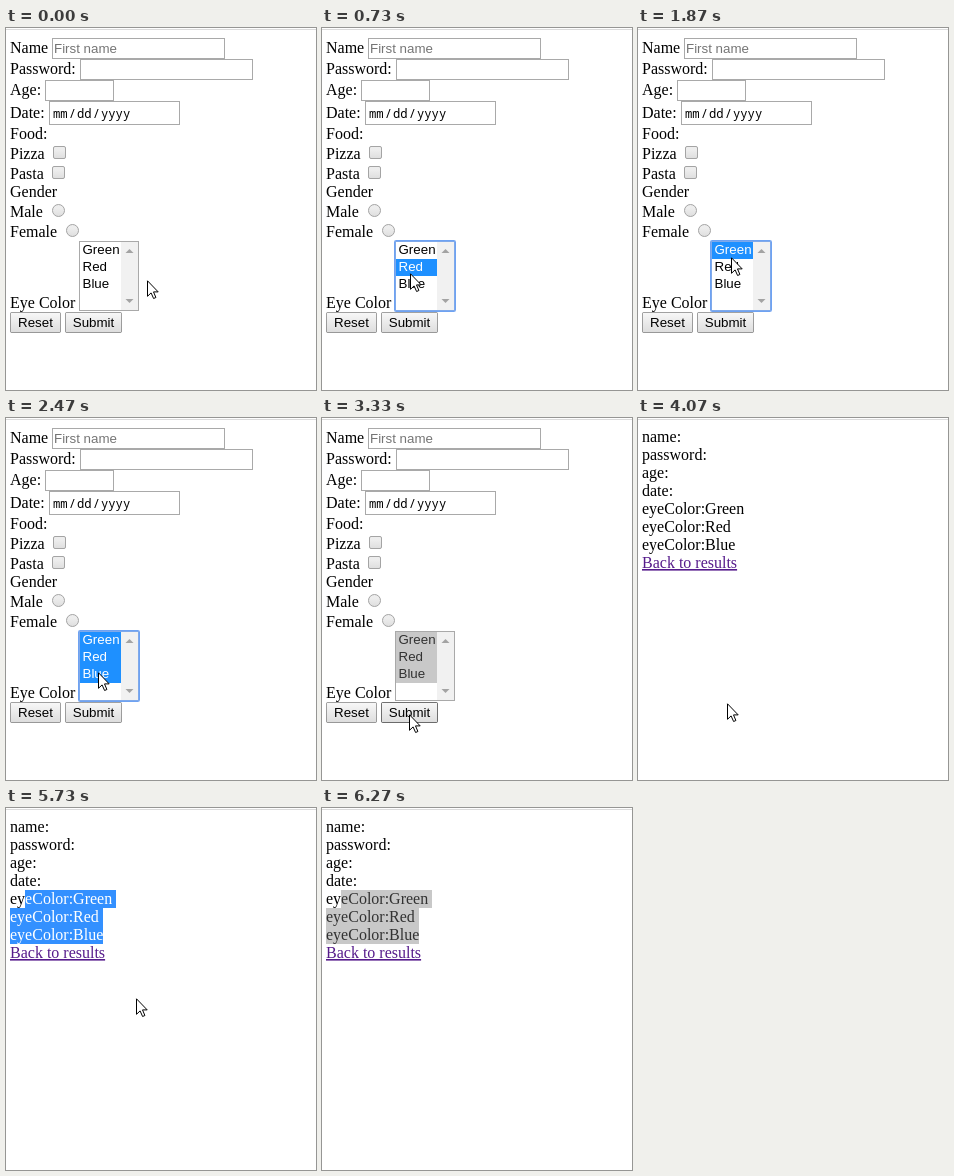
Recreate the animation shown at these times as an HTML page. Size 310 by 362 pixels, loop 6340 ms.

```html
<!DOCTYPE html>
<html lang="en">
<head>
<meta charset="utf-8">
<title>Form demo</title>
<style>
  html, body { margin: 0; width: 100%; height: 100%; overflow: hidden; background: #fff; }
  svg { display: block; width: 310px; height: 362px; }
  text { font: 16px "Liberation Serif", "Times New Roman", serif; white-space: pre; }
  .ui { font: 13.333px "Liberation Sans", Arial, sans-serif; }
  .mono { font: 12.2px "Noto Sans Mono", "DejaVu Sans Mono", monospace; }
  .mid { text-anchor: middle; }
  .field { fill: #fff; stroke: #a9a9a9; }
  .check { fill: url(#soft); stroke: #a4a4a4; }
  .button { fill: url(#raised); stroke: #000; stroke-opacity: .36; }
  .button.hover { stroke-opacity: .55; }
  .button.down { fill: #d6d6d6; }
</style>
</head>
<body>
<svg id="stage" viewBox="0 0 310 362" xmlns="http://www.w3.org/2000/svg">
  <defs>
    <linearGradient id="soft" x2="0" y2="1">
      <stop offset=".3" stop-color="#ededed"/><stop offset="1" stop-color="#dedede"/>
    </linearGradient>
    <linearGradient id="raised" x2="0" y2="1">
      <stop offset="0" stop-color="#f8f8f8"/><stop offset="1" stop-color="#ddd"/>
    </linearGradient>
  </defs>
  <rect width="310" height="362" fill="#fff"/>
  <rect y="1" width="310" height="1" fill="#dcdcdc"/>
  <g id="form"></g>
  <g id="result"></g>
  <path id="arrow" d="M.5 .8V16.3L4.1 12.9L6.6 18.5L8.9 17.5L6.5 11.9H11.2Z" fill="#fff" stroke="#000"/>
  <path id="beam" d="M-3 -7.5H-1L0 -6.5L1 -7.5H3M0 -6.5V6.5M-3 7.5H-1L0 6.5L1 7.5H3" fill="none" stroke="#000"/>
</svg>
<script>
const LOOP = 6340;
const $ = id => document.getElementById(id);
const form = $('form'), result = $('result'), arrow = $('arrow'), beam = $('beam');

function add(parent, tag, attrs, text) {
  const el = document.createElementNS('http://www.w3.org/2000/svg', tag);
  set(el, attrs);
  if (text) el.textContent = text;
  parent.appendChild(el);
  return el;
}
function set(el, attrs) {
  for (const key in attrs) el.setAttribute(key, attrs[key]);
}
function show(el, on) {
  el.setAttribute('visibility', on ? 'visible' : 'hidden');
}
// One-pixel outline whose outer edge is the given box
function frame(cls, x, y, w, h, rx = 0) {
  return add(form, 'rect', { class: cls, x: x + .5, y: y + .5, width: w - 1, height: h - 1, rx });
}
function write(x, y, text, cls = '', fill = '#000') {
  return add(form, 'text', { x, y, class: cls, fill }, text);
}

// Form page
[['Name', 25], ['Password:', 46], ['Age:', 67], ['Date:', 90], ['Food:', 111], ['Pizza', 131],
 ['Pasta', 151], ['Gender', 169], ['Male', 189], ['Female', 209], ['Eye Color', 280]]
  .forEach(([text, y]) => write(4, y, text));
frame('field', 46, 10, 173, 21);
frame('field', 74, 31, 173, 21);
frame('field', 39, 52, 69, 21);
frame('field', 43, 73, 131, 24);
write(48, 25, 'First name', 'ui', '#757575');
[[47, 'mm'], [62.7, '/'], [71, 'dd'], [86.7, '/'], [95, 'yyyy']]
  .forEach(([x, text]) => write(x, 90, text, 'mono'));
frame('check', 47, 118, 13, 13, 1.5);
frame('check', 46, 138, 13, 13, 1.5);
frame('check', 46, 176, 13, 13, 6);
frame('check', 60, 196, 13, 13, 6);

// List box
frame('field', 73, 213, 60, 70);
add(form, 'rect', { x: 115, y: 214, width: 17, height: 68, fill: '#f1f1f1' });
add(form, 'path', { d: 'M119.5 225H127.5L123.5 221ZM119.5 271H127.5L123.5 275Z', fill: '#a3a3a3' });
const options = ['Green', 'Red', 'Blue'].map((text, i) => ({
  bar: add(form, 'rect', { x: 74, y: 214 + 17 * i, width: 41, height: 17 }),
  label: write(76.5, 226 + 17 * i, text, 'ui')
}));
const ring = add(form, 'g', { fill: 'none' });
add(ring, 'rect', { x: 72.5, y: 212.5, width: 61, height: 71, rx: 1, stroke: '#6ea2f2' });
add(ring, 'rect', { x: 73.5, y: 213.5, width: 59, height: 69, stroke: '#7fa9ea' });

frame('button', 4, 284, 51, 21, 1);
const submit = frame('button', 59, 284, 57, 21, 1);
write(29.5, 299, 'Reset', 'ui mid');
write(87.5, 299, 'Submit', 'ui mid');

// Result page
const pen = document.createElement('canvas').getContext('2d');
pen.font = '16px "Liberation Serif", "Times New Roman", serif';
const widthOf = text => pen.measureText(text).width;

['name:', 'password:', 'age:', 'date:'].forEach((text, i) =>
  add(result, 'text', { x: 4, y: 24 + 18 * i }, text));
add(result, 'text', { x: 4, y: 150, fill: '#551a8b', 'text-decoration': 'underline' }, 'Back to results');
const lines = ['Green', 'Red', 'Blue'].map((color, i) => {
  const text = 'eyeColor:' + color;
  const bar = add(result, 'rect', { y: 82 + 18 * i, height: 18 });
  const label = add(result, 'text', { x: 4, y: 96 + 18 * i });
  return { text, bar, parts: [0, 1, 2].map(() => add(label, 'tspan', {})) };
});

// Pointer path: tick (1/15 s), x, y
const path = [
  [0, 141, 252], [2, 129, 247], [5, 97, 226], [7, 90, 224], [10, 88, 245], [12, 88, 245],
  [16, 89, 257], [17, 89, 256], [21, 92, 225], [23, 92, 225], [24, 93, 223], [27, 93, 223],
  [28, 93, 229], [37, 92, 254], [41, 92, 254], [45, 87, 296], [60, 87, 296], [61, 89, 285],
  [70, 33, 91], [72, 21, 91], [73, 23, 91], [75, 70, 98], [77, 107, 117], [80, 132, 130],
  [83, 132, 130], [85, 143, 158], [90, 76, 320], [92, 60, 364], [96, 60, 364]
];
function pointer(k) {
  const i = path.findIndex(p => p[0] > k);
  const [a, x, y] = path[i - 1], [b, u, v] = path[i];
  const f = (k - a) / (b - a);
  return [Math.round(x + (u - x) * f), Math.round(y + (v - y) * f)];
}
const rowAt = (y, top, h) => Math.min(2, Math.max(0, Math.floor((y - top) / h)));

function caretAt(text, x) {
  let i = 0;
  while (i < text.length && x - 4 > (widthOf(text.slice(0, i)) + widthOf(text.slice(0, i + 1))) / 2) i++;
  return i;
}

// First and last selected option
function picked(k) {
  if (k < 7) return [0, -1];
  if (k < 11) return [0, 0];
  if (k < 16) return [1, 1];
  if (k < 23) return [2, 2];
  if (k < 28) return [0, 0];
  return [0, rowAt(pointer(Math.min(k, 37))[1], 214, 17)];
}

function drawForm(k, x, y) {
  const [from, to] = picked(k), focused = k >= 7 && k < 49;
  options.forEach(({ bar, label }, i) => {
    const on = i >= from && i <= to;
    set(bar, { fill: on ? (focused ? '#1e90ff' : '#c8c8c8') : '#fff' });
    set(label, { fill: on ? (focused ? '#fff' : '#323232') : '#000' });
  });
  set(ring, { display: focused ? 'inline' : 'none' });
  const over = x >= 59 && x < 116 && y >= 284 && y < 305;
  set(submit, { class: 'button' + (over ? ' hover' : '') + (k === 49 ? ' down' : '') });
}

function drawResult(k) {
  const [x, y] = pointer(Math.min(k, 80));
  const last = k < 73 ? -1 : rowAt(y, 82, 18);
  const active = k < 94;
  lines.forEach(({ text, bar, parts }, i) => {
    const a = i === 0 ? 2 : 0;
    const b = i < last ? text.length : i === last ? Math.max(a, caretAt(text, x)) : a;
    const start = widthOf(text.slice(0, a));
    const end = widthOf(text.slice(0, b)) + (i < last ? 4 : 0);
    set(bar, { x: Math.round(4 + start), width: Math.round(4 + end) - Math.round(4 + start),
               fill: active ? '#3390ff' : '#c8c8c8' });
    [text.slice(0, a), text.slice(a, b), text.slice(b)].forEach((s, j) => parts[j].textContent = s);
    set(parts[1], { fill: active ? '#fff' : '#323232' });
  });
}

const tickStart = k => Math.round(k * 20 / 3) * 10;

function draw(t) {
  let k = Math.round(t * 15 / 1000);
  if (tickStart(k) > t) k--;
  const [x, y] = pointer(k), done = k >= 53;
  set(form, { display: done ? 'none' : 'inline' });
  set(result, { display: done ? 'inline' : 'none' });
  if (done) drawResult(k); else drawForm(k, x, y);
  const inText = done && y >= 82 && y < 136 && x < 4 + widthOf(lines[rowAt(y, 82, 18)].text);
  show(arrow, !inText);
  show(beam, inText);
  set(arrow, { transform: `translate(${x} ${y})` });
  set(beam, { transform: `translate(${x + .5} ${y})` });
}

const begin = performance.now();
function loop() {
  draw((performance.now() - begin) % LOOP);
  requestAnimationFrame(loop);
}
loop();
</script>
</body>
</html>
```
